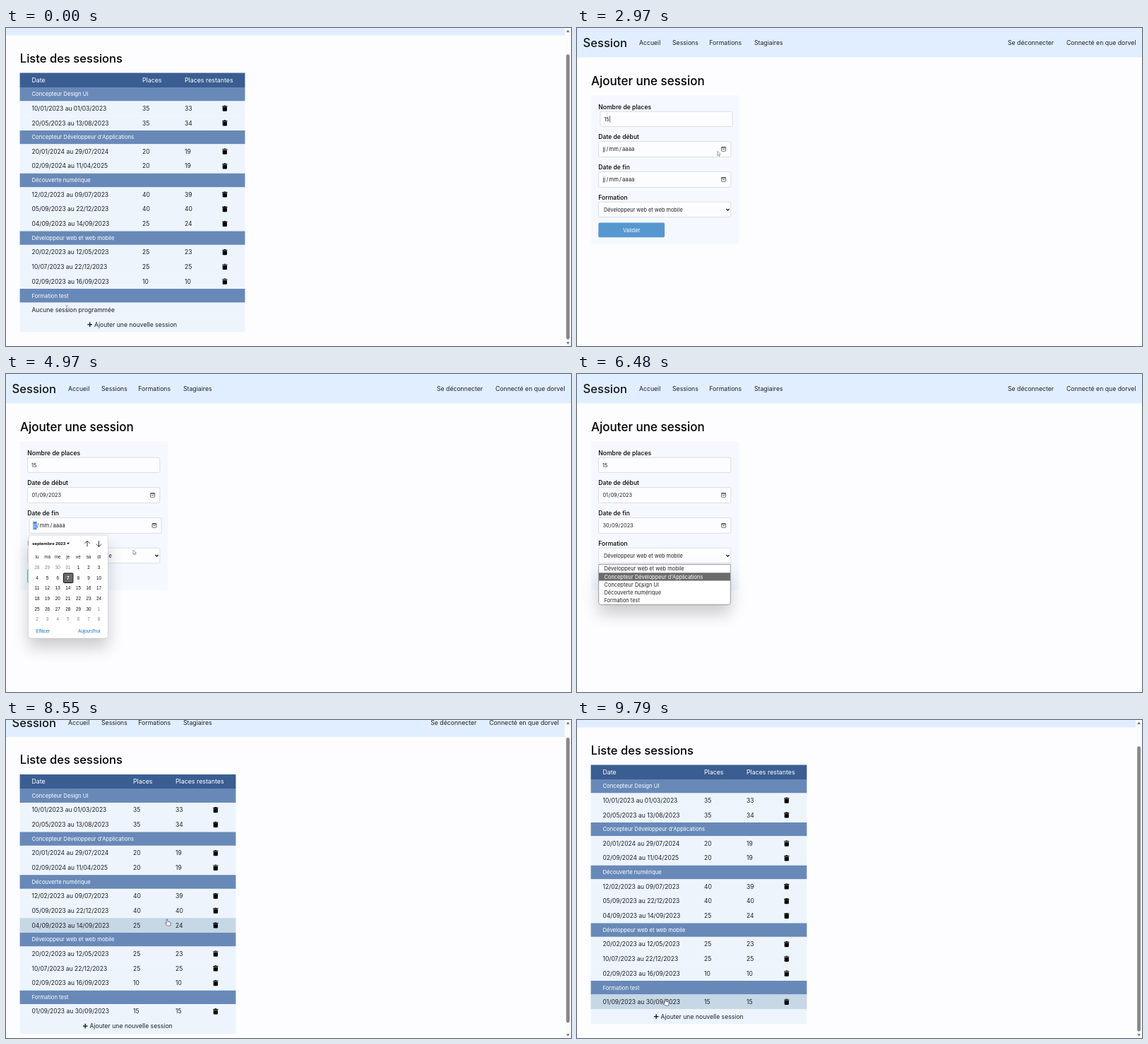
Animation, 800 px wide and 450 px high, one loop 9.88 s. Source, as an HTML page with a canvas:

```html
<!DOCTYPE html>
<html lang="fr">
<head>
<meta charset="utf-8">
<title>Sessions</title>
<style>
  html, body { margin: 0; width: 100%; height: 100%; overflow: hidden; background: #fdfdff; }
  canvas { display: block; width: 800px; height: 450px; }
</style>
</head>
<body>
<canvas id="stage"></canvas>
<script>
const LOOP = 9880, FORM_AT = 1060, LIST_AT = 7850;
const SANS = 'Inter, "Open Sans", sans-serif';
const ARIAL = '"Liberation Sans", Arial, sans-serif';
const INK = '#1f2024';

const canvas = document.getElementById('stage');
const ctx = canvas.getContext('2d');
const ratio = window.devicePixelRatio || 1;
canvas.width = 800 * ratio;
canvas.height = 450 * ratio;

// Pointer path: time, x, y
const POINTER = [
  [0, 86, 397], [250, 88, 398], [750, 148, 419], [1010, 150, 421],
  [1210, 151, 309], [1620, 130, 130], [2560, 130, 130], [2930, 197, 175],
  [3080, 207, 171], [3300, 207, 172], [3800, 102, 231], [4060, 102, 231],
  [4520, 209, 214], [4760, 209, 214], [4970, 180, 249], [5400, 117, 332],
  [5620, 117, 332], [5960, 100, 257], [6160, 100, 257], [6480, 89, 295],
  [6640, 82, 320], [6850, 82, 320], [7350, 78, 286], [8000, 78, 286],
  [8390, 222, 292.5], [8550, 228, 282], [8850, 260, 300], [9120, 280, 340], [9600, 128, 395], [9790, 125, 395]
];

const GROUPS = [
  ['Concepteur Design UI', '10/01/2023 au 01/03/2023|35|33', '20/05/2023 au 13/08/2023|35|34'],
  ["Concepteur Développeur d'Applications", '20/01/2024 au 29/07/2024|20|19', '02/09/2024 au 11/04/2025|20|19'],
  ['Découverte numérique', '12/02/2023 au 09/07/2023|40|39', '05/09/2023 au 22/12/2023|40|40', '04/09/2023 au 14/09/2023|25|24'],
  ['Développeur web et web mobile', '20/02/2023 au 12/05/2023|25|23', '10/07/2023 au 22/12/2023|25|25', '02/09/2023 au 16/09/2023|10|10']
];
const OPTIONS = ['Développeur web et web mobile', "Concepteur Développeur d'Applications",
  'Concepteur Design UI', 'Découverte numérique', 'Formation test'];

const clamp = v => Math.max(0, Math.min(1, v));
const ease = v => { v = clamp(v); return v * v * (3 - 2 * v); };
const ramp = (t, from, to) => ease((t - from) / (to - from));
const during = (t, from, to) => t >= from && t < to;
const inBox = ([x, y], x0, y0, x1, y1) => x >= x0 && x <= x1 && y >= y0 && y <= y1;

function pointerAt(t) {
  const i = POINTER.findIndex(p => p[0] > t);
  if (i < 0) return POINTER[POINTER.length - 1].slice(1);
  if (i === 0) return POINTER[0].slice(1);
  const [t0, x0, y0] = POINTER[i - 1], [t1, x1, y1] = POINTER[i];
  const k = ramp(t, t0, t1);
  return [x0 + (x1 - x0) * k, y0 + (y1 - y0) * k];
}

function rect(x, y, w, h, fill, radius = 0, stroke, line = 0.7) {
  ctx.beginPath();
  ctx.roundRect(x, y, w, h, radius);
  if (fill) { ctx.fillStyle = fill; ctx.fill(); }
  if (stroke) { ctx.strokeStyle = stroke; ctx.lineWidth = line; ctx.stroke(); }
}

function lines(points, stroke, width, fill) {
  ctx.beginPath();
  points.forEach(([x, y], i) => i ? ctx.lineTo(x, y) : ctx.moveTo(x, y));
  if (fill) { ctx.closePath(); ctx.fillStyle = fill; ctx.fill(); }
  if (stroke) { ctx.strokeStyle = stroke; ctx.lineWidth = width; ctx.stroke(); }
}

// y is the optical middle of the capitals
function text(str, x, y, size, { color = INK, weight = 400, align = 'left', family = SANS } = {}) {
  ctx.font = `${weight} ${size}px ${family}`;
  ctx.textAlign = align;
  ctx.fillStyle = color;
  ctx.fillText(str, x, y + size * 0.36);
  return ctx.measureText(str).width;
}

function withShadow(draw) {
  ctx.save();
  ctx.shadowColor = 'rgba(0,0,0,.2)';
  ctx.shadowBlur = 22 * ratio;
  ctx.shadowOffsetY = 13 * ratio;
  draw();
  ctx.restore();
}

function drawNav(width) {
  rect(0, 0, width, 41.5, '#e1eeff');
  text('Session', 8.5, 21, 16.6, { weight: 500, color: '#15161a' });
  [['Accueil', 88], ['Sessions', 135], ['Formations', 187.3], ['Stagiaires', 251]]
    .forEach(([label, x]) => text(label, x, 21, 8.7));
  text('Se déconnecter', width - 125, 21, 8.7, { align: 'right' });
  text('Connecté en que dorvel', width - 8.5, 21, 8.7, { align: 'right' });
}

function tableRows(added) {
  const rows = [{ kind: 'head', h: 20.5 }];
  const last = ['Formation test', added ? '01/09/2023 au 30/09/2023|15|15' : 'Aucune session programmée'];
  for (const [title, ...sessions] of [...GROUPS, last]) {
    rows.push({ kind: 'group', h: 19.4, cells: [title] });
    for (const s of sessions) {
      const cells = s.split('|');
      rows.push({ kind: cells.length > 1 ? 'data' : 'empty', h: 20.75, cells });
    }
  }
  rows.push({ kind: 'add', h: 20.75 });
  let y = 94.5;
  for (const row of rows) { row.y = y; y += row.h; }
  return rows;
}
const TABLES = [tableRows(false), tableRows(true)];

const scrollAt = t => t < FORM_AT ? 31 : 31 * clamp((t - 8320) / 410);

function rowUnder(t, added) {
  const [x, py] = pointerAt(t), y = py + scrollAt(t);
  if (x < 20 || x > (added ? 325.5 : 338.5)) return null;
  return TABLES[+added].find(r => y >= r.y && y < r.y + r.h) || null;
}

// Hover colour fades over the last moments of the pointer's path
function hoverAmount(row, t, added) {
  const steps = 12, since = added ? LIST_AT : 0;
  let hits = 0;
  for (let i = 0; i < steps; i++) {
    const at = t - i * 14;
    if (at >= since && rowUnder(at, added) === row) hits++;
  }
  return hits / steps;
}

function drawTrash(x, y) {
  rect(x - 3.7, y - 3.5, 7.4, 1.1, '#000', 0.4);
  rect(x - 1.4, y - 4.2, 2.8, 1, '#000', 0.4);
  rect(x - 3.1, y - 2, 6.2, 6, '#000', [0, 0, 1, 1]);
}

function drawTable(t, added) {
  const left = 19.6, width = added ? 305.8 : 318.8, shift = added ? -13 : 0;
  const fills = { head: '#3a5e92', group: '#6889b8' };
  for (const row of TABLES[+added]) {
    const { kind, y, h, cells } = row, mid = y + h / 2;
    rect(left, y, width, h + 0.2, fills[kind] || '#edf4fc');
    if (kind === 'data' || kind === 'add') {
      ctx.globalAlpha = hoverAmount(row, t, added);
      rect(left, y, width, h, '#c6d7e6');
      ctx.globalAlpha = 1;
    }
    if (kind === 'head') {
      [['Date', 36.5], ['Places', 193 + shift], ['Places restantes', 253 + shift]]
        .forEach(([label, x]) => text(label, x, mid, 8.8, { color: '#fff' }));
    } else if (kind === 'group') {
      text(cells[0], 36.5, mid, 7.7, { color: '#fff' });
    } else if (kind === 'add') {
      const x = 118.7 + shift / 2;
      rect(x - 3.3, mid - 0.65, 6.6, 1.3, '#111');
      rect(x - 0.65, mid - 3.3, 1.3, 6.6, '#111');
      text('Ajouter une nouvelle session', x + 6.3, mid, 8.65);
    } else {
      text(cells[0], 36.5, mid, 8.5);
      if (kind === 'data') {
        text(cells[1], 193 + shift, mid, 8.5);
        text(cells[2], 253 + shift, mid, 8.5);
        drawTrash(309.8 + shift, mid);
      }
    }
  }
}

function drawScrollbar(scroll) {
  rect(791.3, 0, 8.7, 450, '#fbfbfd');
  rect(793.2, 9.3 + scroll * 0.9, 4.8, 403.5, '#878787', 2.4);
  lines([[793.3, 6], [798, 6], [795.7, 2.4]], null, 0, '#777');
  lines([[793.3, 444.2], [798, 444.2], [795.7, 447.8]], null, 0, '#777');
}

function drawList(t, added) {
  const scroll = scrollAt(t);
  ctx.save();
  ctx.translate(0, -scroll);
  drawNav(791.3);
  text('Liste des sessions', 19.8, 73.8, 16.6, { weight: 550, color: '#000' });
  drawTable(t, added);
  ctx.restore();
  drawScrollbar(scroll);
}

function drawField(label, y, h, shift = 0) {
  text(label, 30.3, y - 6.5, 8.6, { weight: 550, color: '#000' });
  rect(30.5 + shift, y, 187.3, h, '#fdfdff', 2, '#ccd3dc');
}

function drawDate(value, y, shift, selected) {
  const empty = value.startsWith('j');
  const size = empty ? 7.7 : 7.3, gap = empty ? 1.2 : 0.4;
  let x = 36.5 + shift;
  value.split(/(\/)/).forEach((part, i) => {
    const marked = selected && i === 0;
    if (marked) rect(x - 0.5, y - 5.5, 5, 11, '#2f7fdc');
    x += text(part, x, y, size, { color: marked ? '#fff' : INK }) + gap;
  });
  const ix = 204.6 + shift;
  rect(ix, y - 2.8, 6, 5.8, null, 0.8, '#333', 0.7);
  rect(ix, y - 2.8, 6, 1.1, '#333');
  rect(ix + 1.2, y, 3.6, 0.7, '#333');
}

function drawCalendar(top, pointer) {
  const opt = { family: ARIAL, align: 'center' };
  withShadow(() => rect(31.7, top, 112.8, 146, '#fff', 4));
  rect(31.7, top, 112.8, 146, '#fff', 4, '#bbbbc0', 0.5);
  text('septembre 2023', 37, top + 12, 6.25, { family: ARIAL, weight: 700, color: '#000' });
  lines([[86, top + 10.8], [90, top + 10.8], [88, top + 13.2]], null, 0, '#111');
  for (const [x, dir] of [[115, -1], [131.5, 1]]) {
    const y = top + 12.3, tip = y + dir * 4;
    lines([[x, y - dir * 4], [x, tip]], '#222', 0.9);
    lines([[x - 3.6, tip - dir * 3.6], [x, tip], [x + 3.6, tip - dir * 3.6]], '#222', 0.9);
  }
  'lu ma me je ve sa di'.split(' ').forEach((d, i) => text(d, 44 + i * 14.6, top + 31, 6.3, opt));
  for (let i = 0; i < 42; i++) {
    const day = i < 4 ? 28 + i : (i - 4) % 30 + 1;
    const inside = i >= 4 && i < 34, today = i === 10;
    const x = 44 + i % 7 * 14.6, y = top + 46 + Math.floor(i / 7) * 14.6;
    const over = Math.abs(pointer[0] - x) < 7.3 && Math.abs(pointer[1] - y) < 7.3;
    if (today) rect(x - 6.3, y - 6.7, 13.4, 13.6, '#6a6a6a', 1, '#111', 1);
    else if (over) rect(x - 7, y - 7, 14, 14, '#e6e6e8', 1);
    text(day, x, y, 6.3, { ...opt, weight: today ? 700 : 400, color: today ? '#fff' : inside ? '#111' : '#85858a' });
  }
  text('Effacer', 42.3, top + 135.3, 6.3, { family: ARIAL, color: '#1770d0' });
  text("Aujourd'hui", 133.5, top + 135.3, 6.3, { family: ARIAL, align: 'right', color: '#1770d0' });
}

function drawOptions(t) {
  const lagged = pointerAt(t - 60)[1];
  const active = Math.max(0, Math.min(4, Math.floor((lagged - 270) / 11.3)));
  withShadow(() => rect(30.7, 269.5, 186.6, 57, '#fff', [0, 0, 3, 3]));
  rect(30.7, 269.5, 186.6, 57, '#fff', [0, 0, 3, 3], '#77777c', 0.7);
  OPTIONS.forEach((label, i) => {
    const y = 275.6 + i * 11.3;
    if (i === active) rect(31, y - 5.6, 186, 11.3, '#6b6b6c');
    text(label, 38.5, y, 7.45, { color: i === active ? '#fff' : INK });
  });
}

function drawForm(t, pointer) {
  const focus = (from, to) => 2.4 * (ramp(t, from, from + 180) - ramp(t, to, to + 180));
  const places = focus(1700, 3120), start = focus(3120, 4600), end = focus(4600, 6070);
  drawNav(800);
  text('Ajouter une session', 20, 74.8, 17, { weight: 550, color: '#000' });
  rect(20, 95, 207.5 + 1.8 * ramp(t, 1700, 1880), 211.3, '#f5f9ff', 2);

  drawField('Nombre de places', 118.2, 21.2, places);
  const typed = t < 2280 ? '' : t < 2480 ? '1' : '15';
  const w = text(typed, 36 + places, 129, 7.3);
  if (during(t, 1700, 3120) && (t - 2480) % 1000 < 520) rect(36.4 + places + w, 124.2, 0.6, 9.4, '#111');

  drawField('Date de début', 160.4, 22, start);
  drawDate(t < 4020 ? 'jj/mm/aaaa' : '01/09/2023', 171.3, start, during(t, 3120, 4020));
  drawField('Date de fin', 203.4, 22, end);
  drawDate(t < 5580 ? 'jj/mm/aaaa' : '30/09/2023', 214.4, end, during(t, 4600, 5580));

  drawField('Formation', 246.2, 21.4);
  text(OPTIONS[t < 6840 ? 0 : 4], 38, 257, 7.35);
  lines([[211.4, 256], [213.5, 258.2], [215.6, 256]], '#111', 1.2);

  const overButton = inBox(pointer, 30, 275, 124, 297);
  rect(30.3, 275.5, 93.8, 20.8, overButton ? '#4a88c0' : '#5797cf', 2);
  text('Valider', 77.2, 286, 7.5, { color: '#fff', align: 'center' });

  if (during(t, 3180, 4020)) drawCalendar(185, pointer);
  if (during(t, 4700, 5580)) drawCalendar(228, pointer);
  if (during(t, 6100, 6840)) drawOptions(t);
}

function pointerKind(t, pos) {
  if (during(t, FORM_AT, LIST_AT)) {
    if (inBox(pos, 30, 118, 221, 140)) return 'text';
    return t > 6840 && inBox(pos, 30, 275, 124, 297) ? 'hand' : 'arrow';
  }
  const row = rowUnder(t, t >= LIST_AT);
  if (!row) return 'arrow';
  return row.kind === 'data' || row.kind === 'add' ? 'hand' : 'text';
}

function drawPointer(kind, [x, y]) {
  ctx.save();
  ctx.translate(x, y);
  ctx.lineJoin = 'round';
  if (kind === 'text') {
    lines([[-1.8, -4.5], [0, -4], [1.8, -4.5]], '#777', 0.6);
    lines([[0, -4], [0, 4]], '#777', 0.6);
    lines([[-1.8, 4.5], [0, 4], [1.8, 4.5]], '#777', 0.6);
  } else if (kind === 'hand') {
    lines([[-0.8, 0], [0.6, 0], [0.9, 3.2], [4.8, 4.1], [5.2, 5], [4.6, 9.2], [0.2, 9.2],
      [-2.7, 5.4], [-2.2, 4.6], [-0.8, 5.6], [-0.8, 0]], '#444a52', 0.7, '#fff');
  } else {
    lines([[0, 0], [0, 6.3], [1.4, 5.1], [2.4, 7.2], [3.4, 6.8], [2.5, 4.7], [4.4, 4.5], [0, 0]],
      '#66666b', 0.6, '#fff');
  }
  ctx.restore();
}

function render() {
  const t = performance.now() % LOOP;
  const pointer = pointerAt(t);
  ctx.setTransform(ratio, 0, 0, ratio, 0, 0);
  rect(0, 0, 800, 450, '#fdfdff');
  if (during(t, FORM_AT, LIST_AT)) drawForm(t, pointer);
  else drawList(t, t >= LIST_AT);
  drawPointer(pointerKind(t, pointer), pointer);
  requestAnimationFrame(render);
}
render();
</script>
</body>
</html>
```
